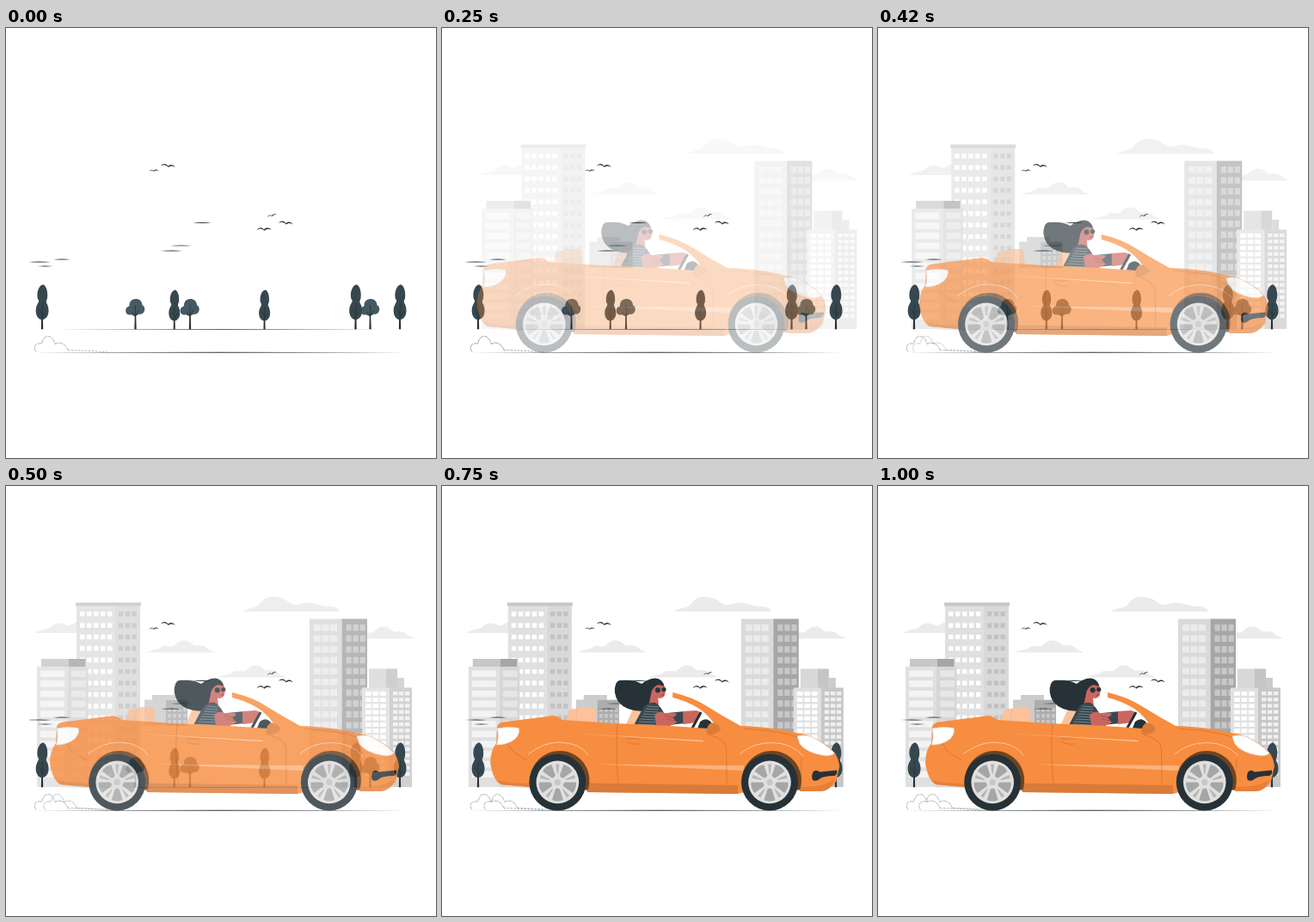
Write an HTML page that moves like this. It is 500 px wide and 500 px high and loops after 1.04 s.

```html
<!DOCTYPE html>
<html lang="en">
<head>
<meta charset="utf-8">
<title>Convertible</title>
<style>
html, body { margin: 0; width: 100%; height: 100%; overflow: hidden; background: #fff; }
svg { display: block; width: 100vw; height: 100vh; }
</style>
</head>
<body>
<svg viewBox="0 0 500 500">
  <defs>
    <path id="cloud" fill="#ebebeb" d="M0 0C8-4 11-2 16-5C20-9 25-7 30-7C35-8 36-14 44-14C52-14 52-9 58-8C66-10 70-6 73-3C77-2 79-1 80 0Z"/>
    <path id="bird" fill="#263238" d="M-8.500 .8C-6-2.400-2-2.400 0 1C2.500-1.500 6-1 8.500 2.500C5 .5 3 .5 .2 2.500C-2-.5-5-1.200-8.500 .8Z"/>
    <g id="cypress">
      <path fill="#263238" d="M-1.200 0L-.7-20H.7L1.200 0Z"/>
      <path fill="#37474f" d="M1-52C-4-51-7-42-5-35C-3-33-4-32-5-30C-9-24-8-12 0-11C8-12 9-22 6-29C4-32 5-33 6-36C7-43 5-51 1-52Z"/>
      <path fill="none" stroke="#263238" stroke-width=".8" d="M0 0L.4-30M0-14L3.500-20M0-17L-3-23"/>
    </g>
    <g id="oak">
      <path fill="#455a64" d="M-5-17C-12-15-14-25-7-27C-8-38 8-38 8-28C13-26 11-16 4-17.500Q0-14-5-17Z"/>
      <path fill="none" stroke="#263238" stroke-width=".8" d="M0-10V-28M0-16L4-22M0-14L-4-20"/>
      <path fill="#263238" d="M-1.200 0L-.6-18H.6L1.200 0Z"/>
    </g>
    <g id="dust" fill="none" stroke="#263238" stroke-width=".35">
      <path stroke-dasharray="5 .7" d="M35 376.500C31 371 34 365.500 42 367C43 356 54 355 57 367.500C63 364 69 367 72 374.500"/>
      <path stroke-dasharray="2.500 1.500" d="M72 374.500Q95 375 120 377"/>
    </g>
    <g id="wheel">
      <path fill="#70441f" d="M-30.200 9A34.500 34.500 0 1 1 35.200 9Z"/>
      <circle r="33" fill="#263238"/>
      <circle r="24.800" fill="#e0e0e0"/>
      <g id="slots"></g>
      <circle r="3.600" fill="#c7c7c7"/>
    </g>
  </defs>

  <g id="city">
    <path fill="#ebebeb" d="M271 146C280 140 287 143 291 137C296 129 305 127 315 130C323 132 326 137 331 138C338 139 340 135 350 136C360 137 362 140 370 140C378 140 382 141 384 146Z"/>
    <path fill="#ebebeb" d="M29 171C38 165 45 168 49 163C54 158 62 159 66 162C71 164 75 157 82 158L100 171Z"/>
    <use href="#cloud" x="159" y="193.500"/>
    <use href="#cloud" x="242" y="222.500"/>
    <use href="#cloud" x="391" y="177.500"/>
    <g id="blocks"></g>
  </g>

  <g id="scene">
    <use href="#bird" transform="translate(188.500 159.500)"/>
    <use href="#bird" transform="translate(171.700 165.300) rotate(-8) scale(.65)"/>
    <use href="#bird" transform="translate(309 217.600) rotate(-22) scale(.65)"/>
    <use href="#bird" transform="translate(325.500 226)"/>
    <use href="#bird" transform="translate(299.800 233.300) rotate(-8)"/>
  </g>

  <g id="car">
    <use href="#dust" x="14.500"/>
    <!-- seats -->
    <path fill="#fbc29b" d="M143 275L146 262Q147 259 152 259H156Q157 257 160 257H173Q177 258 177 262L178 277Z"/>
    <path fill="none" stroke="#f3b187" stroke-width=".7" d="M154 275L156 259"/>
    <path fill="#fbc29b" d="M212 279L220 261Q222 257 226 257Q231 257 231 262L229 279Z"/>
    <!-- driver -->
    <path fill="#263238" d="M206 226Q222 224.500 231 230Q238 224 247 223.500Q255 224 257 232Q249 231 246 236L243 247Q240 258 235 261.500Q214 263 204 251Q197 240 201 230Q203 226 206 226Z"/>
    <path fill="#c9675f" d="M242.500 239Q246 231 252 231L257.500 232.500Q259.500 239 257.500 244Q255 248 250 246.500L251 256H239Z"/>
    <path fill="#263238" d="M240 238Q245 227 257 233L256 229Q248 224 240 230Z"/>
    <path fill="none" stroke="#9c2f38" d="M254 243.300L257 242.700"/>
    <g fill="#263238" stroke="#70605f" stroke-width=".5">
      <circle cx="249.700" cy="237.300" r="3.100"/><circle cx="256.700" cy="236.600" r="2.600"/>
    </g>
    <path fill="#37474f" d="M221 280L232 259Q238 250 247 252Q253 256 257 264L258 280Z"/>
    <path id="stripes" fill="none" stroke="#9fa9ad" stroke-width=".6"/>
    <path fill="#37474f" d="M250 265L281 262V276L252 279Z"/>
    <path fill="#c9675f" d="M279 262L294 261Q301 262 299 268Q295 275 288 276L279 277Z"/>
    <path fill="#c9675f" d="M246 266Q252 260 258 264L271 264Q273 267 267 269L272 275L262 280L248 278Z"/>
    <path fill="none" stroke="#984640" stroke-width=".6" d="M258 267L267 269M260 271L270 273"/>
    <path fill="none" stroke="#263238" stroke-width="3" d="M289 283L300 263"/>
    <path fill="#263238" d="M295 284L299 274Q306 268 312 275L310 284Z"/>
    <!-- body -->
    <path fill="#f78d40" d="M63 280Q64 275.500 70 274.500L127 267.300Q133 267 139 272L200 276Q260 278 308 282L345 279Q385 280 412 287.500Q424 288.500 432 293Q448 301 456 311Q460 317 461 326L457 344Q450 353.500 440 355H415L412 338L343 358L168 356L160 338L101 350L67 347Q58 342 55 322Q55 308 62 299Z"/>
    <path fill="#f78d40" d="M267 240Q290 245.500 305 255Q325 267.500 348 280L335 285L320 283Q309 266 298 259Q284 250 267 246Z"/>
    <path fill="#d97a38" d="M168 345.500L343 348V358L168 356Z"/>
    <path fill="#e58039" d="M416 350Q438 351 455 342Q451 354 440 355H416ZM63 342Q80 346 101 346V350L67 347Z"/>
    <path fill="#fbb27c" d="M180 323.500L350 325L349 331Z"/>
    <path fill="#fcc79f" d="M150 287.500L303 296L302 297.300Z"/>
    <path fill="none" stroke="#fcc79f" d="M99 312Q116 298 136 298Q160 299 169 313M345 312Q360 298.500 382 298.500Q405 298.500 419 314"/>
    <path fill="none" stroke="#bd6527" stroke-width=".5" d="M203 277Q200 312 204 345M309 289Q329 295 329.500 305L330 347M74 297Q79 308 84 311L98 319M212 294H229M213 297Q219 301 229 300M350 282Q394 285 412 292M417 317L415 349"/>
    <path fill="#db7b38" d="M307 289Q305 280 312 275Q321 276 323 283Q319 289 307 289Z"/>
    <path fill="#fff" stroke="#e0e0e0" stroke-width=".7" d="M63 282Q76 279.500 88 281.500Q90 287 84 294Q75 301 62.500 301Q65.500 290 63 282Z"/>
    <path fill="#fff" stroke="#e0e0e0" stroke-width=".7" d="M412 291Q419 289 427 291Q444 299 455 310.500Q452 314.500 441 313Q423 310 415 300Z"/>
    <path fill="#263238" d="M430 333Q433 329 438 332.500L458 330.500Q459 335.500 455 337Q442 337 438 340.500Q434 344 430 342Q428 338 430 333Z"/>
    <use href="#wheel" x="133.200" y="344.400"/>
    <use href="#wheel" x="379.800" y="344.400"/>
  </g>
</svg>
<script>
const $ = id => document.getElementById(id);
const add = (id, markup) => $(id).insertAdjacentHTML('beforeend', markup);
const rect = (x, y, w, h, fill) => `<rect x="${x}" y="${y}" width="${w}" height="${h}" fill="${fill}"/>`;

function windows(xs, y, w, h, pitch, fill, end = 344) {
  let out = '';
  for (; y + h <= end; y += pitch) for (const x of xs) out += rect(x, y, w, h, fill);
  return out;
}

// thin horizontal streak, tapered at both ends
const streak = (x1, x2, y, r, fill = '#263238') => {
  const m = (x1 + x2) / 2;
  return `<path fill="${fill}" d="M${x1} ${y}Q${m} ${y - 2 * r} ${x2} ${y}Q${m} ${y + 2 * r} ${x1} ${y}Z"/>`;
};
const tree = (kind, x, s = 1) =>
  `<use href="#${kind}" transform="translate(${x} 350.3) scale(${s})"/>`;

add('blocks', [
  // tall left tower
  rect(78, 139, 45, 211, '#e0e0e0'), rect(123, 139, 29, 211, '#d9d9d9'),
  rect(77, 135.5, 76, 4, '#c7c7c7'),
  windows([82, 90, 98, 106, 114], 146, 5.4, 5.4, 13.4, '#fff'),
  windows([127, 135, 142.5], 146, 5.2, 5.4, 13.4, '#c2c2c2'),
  // low left block
  rect(37, 201, 32, 9.5, '#c7c7c7'), rect(69, 201, 19.5, 9.5, '#a6a6a6'),
  rect(32, 210, 36, 140, '#e0e0e0'), rect(68, 210, 23.5, 140, '#d6d6d6'),
  windows([36], 214.5, 28, 7.5, 11.7, '#f3f3f3'),
  windows([72], 214.5, 17, 7.5, 11.7, '#e6e6e6'),
  // distant block
  rect(166, 243, 27, 6, '#cccccc'), rect(157, 248.5, 50, 30, '#cccccc'),
  rect(182, 249, 25, 30, '#adadad'),
  windows([184, 190, 196, 202], 258, 4, 4.5, 7, '#c7c7c7', 278),
  // tall right tower
  rect(349, 154.5, 37.5, 195.5, '#dadada'), rect(386.5, 154.5, 29.5, 195.5, '#a6a6a6'),
  windows([354, 363.5, 373], 161, 8, 7.5, 12.6, '#ebebeb'),
  windows([391.5, 399.5, 407.5], 161, 6.2, 7.5, 12.6, '#c7c7c7'),
  // low right block
  rect(418, 212.5, 20, 23, '#d8d8d8'), rect(438, 212.5, 13, 23, '#c5c5c5'),
  rect(451, 223, 8, 12, '#cccccc'),
  rect(410, 234.5, 32, 115.5, '#e0e0e0'), rect(442, 234.5, 26, 115.5, '#c7c7c7'),
  windows([414, 422.5, 431], 239, 6.8, 4.8, 7.2, '#fff'),
  windows([446, 453, 460], 239, 5.4, 4.3, 7.2, '#f0f0f0')
].join(''));

add('scene', [
  streak(26, 52, 272, .5), streak(36, 55, 277, .45), streak(55, 75, 269, .5),
  streak(180, 205, 259, .5), streak(191, 216, 253, .5, '#455a64'), streak(217, 239, 226.5, .6),
  streak(60, 440, 350.3, .4),
  tree('cypress', 42), tree('oak', 150.5), tree('oak', 214),
  tree('cypress', 195.7, .88), tree('cypress', 300.5, .88),
  tree('oak', 423.5), tree('cypress', 406.5), tree('cypress', 458),
  streak(33, 467, 377.3, .45), '<use href="#dust"/>'
].join(''));

for (let a = 36; a < 396; a += 72) {
  add('slots', `<path fill="#a6a6a6" transform="rotate(${a})" d="M-2.5-8L-6.5-20.5Q0-23.5 6.5-20.5L2.5-8Q0-6-2.5-8Z"/>
    <path fill="#b5b5b5" transform="rotate(${a + 36})" d="M-.6-10L-2-21H2L.6-10Z"/>`);
}

let d = '';
for (let y = 256; y < 278; y += 3) d += `M${238 - (y - 255) * .55} ${y}L${251 - (y - 255) * .1} ${y + 1}`;
$('stripes').setAttribute('d', d);

const LOOP = 1040, FRAMES = 25, SHIFT = 21;
const curve = (s, a, b) => 3 * s * (1 - s) ** 2 * a + 3 * s * s * (1 - s) * b + s ** 3;

// cubic-bezier(.36, -.01, .5, 1.38), solved by bisection
function ease(x) {
  let lo = 0, hi = 1;
  for (let n = 0; n < 30; n++) {
    const mid = (lo + hi) / 2;
    if (curve(mid, .36, .5) < x) lo = mid; else hi = mid;
  }
  return curve(hi, -.01, 1.38);
}

function place(id, dx, alpha) {
  $(id).setAttribute('transform', `translate(${dx.toFixed(3)} 0)`);
  $(id).setAttribute('opacity', alpha);
}

function draw() {
  const t = performance.now() % LOOP;
  const step = Math.min(FRAMES - 1, Math.floor(t * FRAMES / LOOP + .1));
  const p = step ? ease(Math.min(1, (step + 1.4) / FRAMES)) : 0;
  const alpha = Math.max(0, Math.min(1, p));
  place('city', SHIFT * (1 - p), alpha);
  place('car', -SHIFT * (1 - p), alpha);
  requestAnimationFrame(draw);
}
draw();
</script>
</body>
</html>
```
